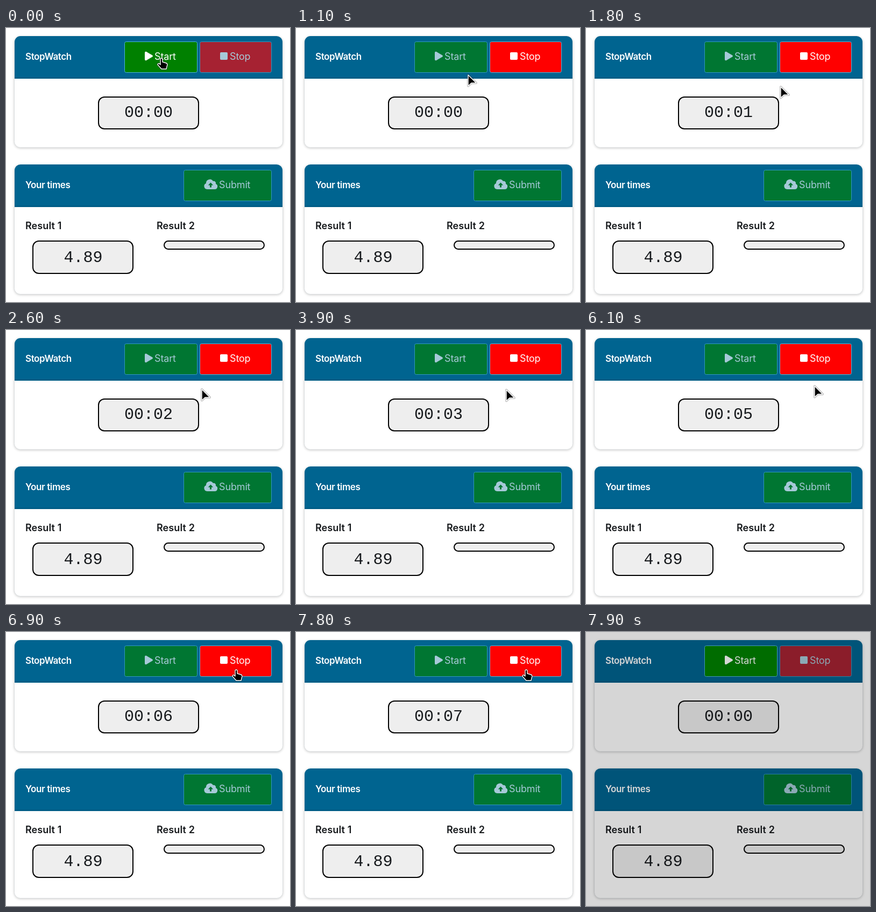
Recreate the animation shown at these times as an HTML page. Size 528 by 508 pixels, loop 8000 ms.

```html
<!DOCTYPE html>
<html lang="en">
<head>
<meta charset="utf-8">
<title>StopWatch</title>
<style>
  html, body { margin: 0; width: 100%; height: 100%; overflow: hidden; background: #fff; }
  svg { display: block; }
  text { font-family: Inter, "Open Sans", sans-serif; font-size: 18px; fill: #fff; }
  .title { font-size: 17px; font-weight: 600; letter-spacing: -.4px; }
  .label { font-weight: 600; letter-spacing: .1px; fill: #15181b; }
  .time { font-family: "Liberation Mono", monospace; font-size: 30px; text-anchor: middle; fill: #15181b; }
  .card { fill: #fff; stroke: #dcdfe1; filter: drop-shadow(0 1px 2px rgba(0, 0, 0, .2)); }
  .head { fill: #006490; }
  .edge { fill: #000; opacity: .07; }
  .box { fill: #eee; stroke: #000; stroke-width: 2; }
  .button rect.face { stroke: #4eb5d8; }
  .button text { letter-spacing: -.15px; }
  .icon { fill: #fff; }
  .off { opacity: .65; }
  .cursor .halo { fill: none; stroke: #000; stroke-opacity: .25; stroke-width: 4; }
  .cursor .body { fill: #000; stroke: #fff; stroke-width: 1.4; }
  .cursor path { stroke-linejoin: round; }
</style>
</head>
<body>
<svg width="528" height="508" viewBox="0 0 528 508">
  <rect class="card" x="15.5" y="15.5" width="499" height="206" rx="11"/>
  <path class="head" d="M16 94V26a11 11 0 0 1 11-11H503a11 11 0 0 1 11 11V94Z"/>
  <rect class="edge" x="16" y="91" width="498" height="3"/>
  <text class="title" x="36" y="59">StopWatch</text>

  <g class="button" id="start">
    <rect class="face" x="220.5" y="25.5" width="135" height="57" rx="3" fill="green"/>
    <path class="icon" d="M258 46q0-3 3-2L272 50.500q2 1.500 0 3L261 60q-3 1-3-2Z"/>
    <text x="276" y="59">Start</text>
  </g>
  <g class="button" id="stop">
    <rect class="face" x="360.5" y="25.5" width="133" height="57" rx="3" fill="red"/>
    <rect class="icon" x="398" y="45" width="14" height="14" rx="2"/>
    <text x="416" y="59">Stop</text>
  </g>

  <rect class="box" x="172" y="128" width="186" height="59" rx="11"/>
  <text class="time" id="clock" x="265" y="165">00:00</text>

  <rect class="card" x="15.5" y="253.5" width="499" height="240" rx="11"/>
  <path class="head" d="M16 332V264a11 11 0 0 1 11-11H503a11 11 0 0 1 11 11V332Z"/>
  <rect class="edge" x="16" y="329" width="498" height="3"/>
  <text class="title" x="36" y="297">Your times</text>

  <g class="button off">
    <rect class="face" x="330.5" y="263.5" width="163" height="57" rx="3" fill="green"/>
    <path class="icon" d="M374 299a5.700 5.700 0 0 1-2-11a7 7 0 0 1 13-4a4 4 0 0 1 5 5a5.200 5.200 0 0 1-2 10Z"/>
    <path d="M380.500 286.500l4.700 5h-3.200v4h-3v-4h-3.200Z" fill="green"/>
    <text x="396" y="297">Submit</text>
  </g>

  <text class="label" x="36" y="373">Result 1</text>
  <text class="label" x="280" y="373">Result 2</text>
  <rect class="box" x="50" y="395" width="186" height="60" rx="11"/>
  <text class="time" x="143.500" y="434">4.89</text>
  <rect class="box" x="294" y="395" width="186" height="15" rx="7.500"/>

  <g class="cursor" id="arrow">
    <path class="halo" d="M0 0V20.500L6 15H15Z"/>
    <path class="body" d="M0 0V20.500L6 15H15Z"/>
  </g>
  <g class="cursor" id="hand">
    <path class="halo" d="M-2 1Q0-1 2 1V7L9 9Q11 10 11 12L9 20H0L-7 12Q-7 9-4 10L-2 12Z"/>
    <path class="body" d="M-2 1Q0-1 2 1V7L9 9Q11 10 11 12L9 20H0L-7 12Q-7 9-4 10L-2 12Z"/>
  </g>

  <rect id="dim" width="528" height="508" opacity="0"/>
</svg>
<script>
const LOOP = 8000, STEP = 100;
const STARTED = 500, STOPPED = 7900;

// time, x, y of the pointer tip
const path = [
  [0, 289, 56], [600, 289, 56], [1100, 320, 87], [1600, 361, 109],
  [2600, 364, 110], [3900, 391, 111], [5200, 421, 112], [6000, 424, 111],
  [6600, 428, 70], [8000, 428, 70]
];

const [start, stop, clock, arrow, hand, dim] =
  ["start", "stop", "clock", "arrow", "hand", "dim"].map(id => document.getElementById(id));

function pointerAt(t) {
  const i = path.findIndex(p => p[0] > t);
  const [t0, x0, y0] = path[i - 1], [t1, x1, y1] = path[i];
  const k = (t - t0) / (t1 - t0);
  return [Math.round(x0 + (x1 - x0) * k), Math.round(y0 + (y1 - y0) * k)];
}

function show(el, on) {
  el.setAttribute("visibility", on ? "visible" : "hidden");
}

function draw(t) {
  const running = t >= STARTED && t < STOPPED;
  const done = t >= STOPPED;
  const seconds = running ? Math.floor((t - STARTED) / 1000) : 0;
  clock.textContent = "00:" + String(seconds).padStart(2, "0");
  start.classList.toggle("off", running);
  stop.classList.toggle("off", !running);

  const [x, y] = pointerAt(t);
  const over = y < 83 && (x < 356 ? !running : running);
  for (const el of [arrow, hand]) el.setAttribute("transform", `translate(${x} ${y})`);
  show(hand, over && !done);
  show(arrow, !over && !done);
  dim.setAttribute("opacity", done ? .16 : 0);
}

const origin = performance.now();
function tick() {
  const t = (performance.now() - origin) % LOOP;
  draw(Math.floor(t / STEP) * STEP);
  requestAnimationFrame(tick);
}
draw(0);
requestAnimationFrame(tick);
</script>
</body>
</html>
```
